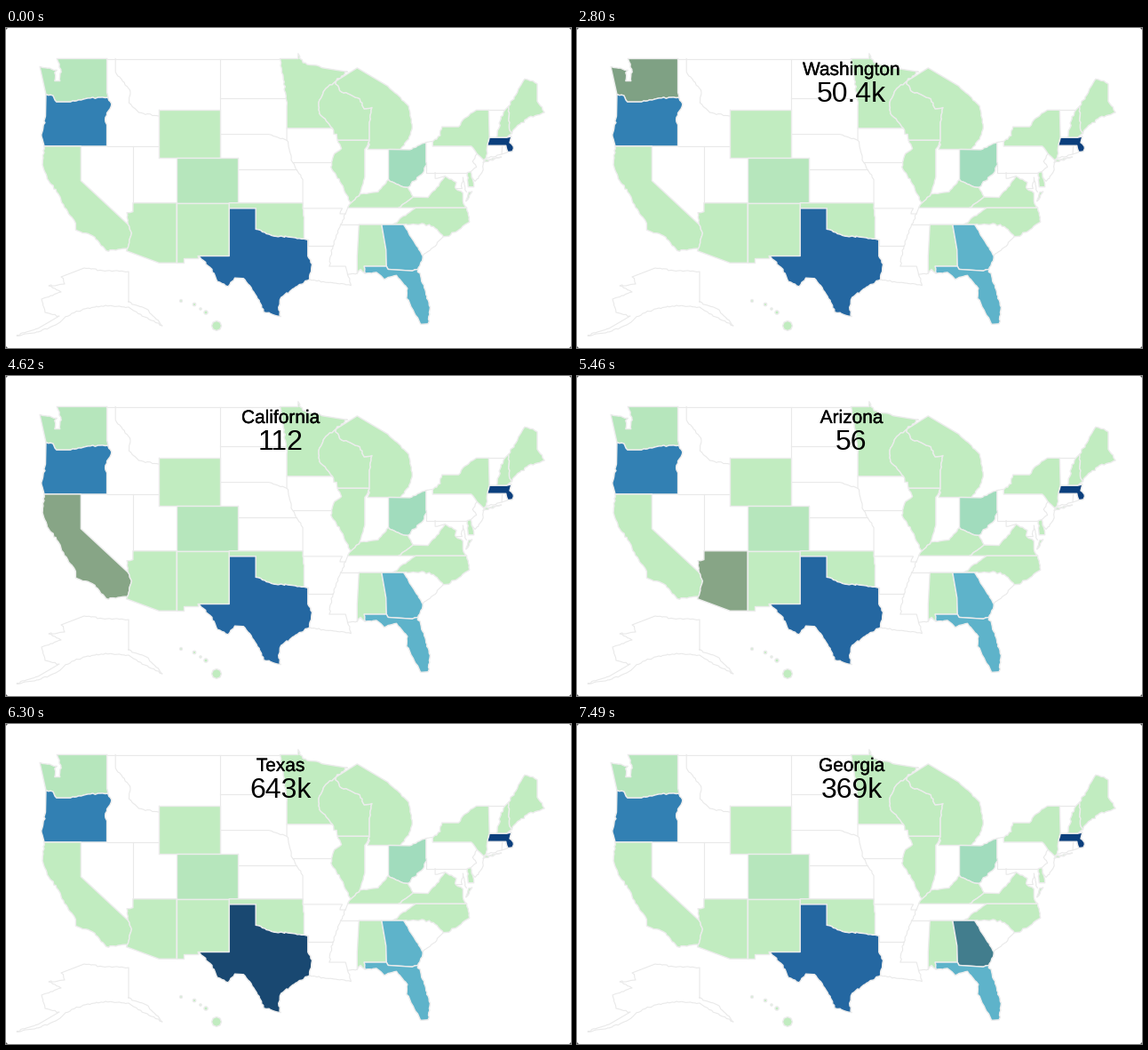
These frames come from a looping animation (636x360 px, 8000 ms). A matplotlib script:

```python
import numpy as np
import matplotlib.pyplot as plt
from matplotlib.animation import FuncAnimation
from matplotlib.colors import to_rgb
from matplotlib.patches import Polygon
from matplotlib.patheffects import withStroke

W, H, DPI = 636, 360, 100
PX = 72 / DPI
STEP, LOOP = 40, 8000
SCALE = 9.84  # pixels per degree of longitude

EDGE, FAINT = "#ececec", "#e9e9e9"
LIGHT, MINT, TEAL = "#c1ecc0", "#b6e6bc", "#a1dcbd"
SKY, BLUE, ROYAL, NAVY = "#5eb3ca", "#3280b3", "#2467a1", "#0b3f7d"

fig = plt.figure(figsize=(W / DPI, H / DPI), dpi=DPI, facecolor="white")
ax = fig.add_axes([0, 0, 1, 1])
ax.set(xlim=(0, W), ylim=(H, 0))
ax.axis("off")

shapes = {}


def merc(lat):
    return np.log(np.tan(np.pi / 4 + np.radians(lat) / 2))


def project(pts, west=124.73, north=49, x0=37.8, y0=34.5):
    """Mercator map of (degrees west, degrees north) to stage pixels."""
    lon, lat = np.array(pts, float).T
    return np.column_stack([x0 + SCALE * (west - lon),
                            y0 + np.degrees(SCALE) * (merc(north) - merc(lat))])


def meander(a, b):
    """Surveyed borders (axis-aligned or long) stay straight, the rest wander.

    The seed depends on both ends alike, so neighbours share one border."""
    size = np.hypot(*(b - a))
    n = int(size / 2.5)
    if n < 2 or size > 27 or min(abs(b - a)) < 0.6:
        return a[None]
    p, q = (a, b) if a[0] < b[0] else (b, a)
    line = p + (q - p) * np.linspace(0, 1, n + 1)[:, None]
    line[1:-1] += np.random.default_rng(int(a @ b)).normal(0, 0.5, (n - 1, 2))
    return (line if p is a else line[::-1])[:-1]


def rough(xy):
    return np.vstack([meander(a, b) for a, b in zip(xy, xy[1:])] + [xy[-1:]])


def fill(xy, color):
    ring = rough(np.vstack([xy, xy[:1]]))
    return ax.add_patch(Polygon(ring, fc=color, ec=EDGE, lw=1.4 * PX,
                                joinstyle="round", zorder=2))


def outline(xy):
    ax.plot(*rough(xy).T, color=FAINT, lw=1.1 * PX, zorder=1)


def state(name, color, *pts):
    shapes[name] = fill(project(pts), color)


def box(name, color, w, e, n, s):
    state(name, color, (w, n), (e, n), (e, s), (w, s))


def border(*pts):
    outline(project(pts))


def back(pts):
    return pts[::-1]


# Borders shared by two states
COLUMBIA = [(124, 46.25), (123.2, 46.15), (122.8, 45.65), (121.2, 45.65),
            (119.2, 45.95), (116.92, 46)]
COLORADO = [(114.05, 36.2), (114.75, 36.1), (114.6, 35), (114.2, 34.2), (114.7, 32.7)]
RED = [(100, 34.56), (97.9, 33.9), (96, 33.8), (94.48, 33.64)]
ST_CROIX = [(92, 46.7), (92.8, 45.6), (92.7, 44.7), (91.22, 43.5)]
UP_LINE = [(90.4, 46.55), (88.1, 45.9), (87.6, 45.1), (86.7, 45.2), (87, 44), (87, 42.5)]
OHIO_W = [(89.1, 37), (88.1, 37.8), (86, 38), (84.82, 39.1)]
OHIO_E = [(84.82, 39.1), (83.7, 38.65), (82.6, 38.4)]
SMOKY = [(84.3, 35), (83.1, 35.8), (81.7, 36.55)]
CHATTAHOOCHEE = [(85.6, 35), (85.1, 32.6), (85.05, 31)]
FLORIDA_N = [(85.05, 31), (84.86, 30.7), (82.1, 30.55), (81.45, 30.7)]
MAINE_W = [(71.08, 45.3), (70.98, 43.4), (70.7, 43.07)]

# Plain states: only the borders that no coloured state draws
border((117.03, 49), (97.23, 49))
border((117.03, 49), (117.03, 46.4), (116.92, 46))
border((116.05, 49), (116.05, 48), (114.4, 46.6), (114.5, 45.56), (113.4, 44.8),
       (111.05, 44.5), (111.05, 45))
border((117.03, 42), (111.05, 42))
border((111.05, 44.5), (111.05, 41))
border((114.05, 42), (114.05, 36.2))
border((104.05, 49), (104.05, 41))
border((104.05, 45.94), (96.56, 45.94))
border((104.05, 43), (98.5, 43), (96.45, 42.5))
border((102.05, 40), (95.3, 40))
border((102.05, 37), (94.62, 37))
border((102.05, 41), (102.05, 37))
border((96.45, 43.5), (96.45, 42.5), (95.77, 40.6), (94.62, 39.1), (94.62, 36.5),
       (90.1, 36.5), (90.37, 36), (89.7, 36))
border((95.77, 40.6), (91.4, 40.6))
border((89.5, 36.5), (90.3, 35), (91.17, 33), (91.6, 31), (89.73, 31), (89.5, 30.2))
border((94.04, 33.55), (94.04, 33), (91.17, 33))
border((90.3, 35), (83.1, 35))
border((88.4, 30.3), (89.5, 30.2), (89.1, 29.1), (91.4, 29.4), (93.85, 29.7))
border((78.55, 33.86), (79.3, 33.1), (80.9, 32.03))
border((80.52, 40.64), (80.52, 39.72), (75.8, 39.72))
border((79.48, 39.72), (79.48, 39.2), (78.35, 39.4))
border((80.52, 42.33), (79.76, 42.4))
border((74.7, 41.36), (75.2, 40.7), (74.75, 40.2), (75.4, 39.8))
border((73.9, 41), (74.1, 39.75), (74.9, 38.95), (75.5, 39.5))
border((77, 38.3), (76.4, 38.3), (76.3, 39.3), (75.9, 38))
border((73.35, 45), (71.5, 45))
border((71.38, 42.05), (71.15, 41.5), (71.86, 41.32), (73.65, 41))
border((71.8, 42.05), (71.86, 41.32))

# West
state("Washington", MINT, (124.7, 48.4), (122.75, 48.13), (123, 47.3), (122.4, 47.3),
      (122.3, 48.2), (122.75, 49), (117.03, 49), (117.03, 46.4), *back(COLUMBIA))
state("Oregon", BLUE, *COLUMBIA, (116.5, 45.5), (117.2, 44.4), (117.03, 43.8),
      (117.03, 42), (124.2, 42), (124.5, 42.8), (124.05, 44.5))
state("California", LIGHT, (124.2, 42), (120, 42), (120, 39), *COLORADO[2:],
      (117.12, 32.53), (118.4, 33.8), (119.2, 34.15), (120.6, 34.5), (120.6, 35.1),
      (121.9, 36.6), (122.5, 37.7), (123.7, 39), (124.4, 40.4))
state("Arizona", LIGHT, (114.05, 37), (109.05, 37), (109.05, 31.33), (111.07, 31.33),
      (114.8, 32.5), *back(COLORADO))
box("Wyoming", LIGHT, 111.05, 104.05, 45, 41)
box("Colorado", MINT, 109.05, 102.05, 41, 37)
state("New Mexico", LIGHT, (109.05, 37), (103.04, 37), (103.04, 32), (106.62, 32),
      (106.62, 31.78), (108.2, 31.78), (108.2, 31.33), (109.05, 31.33))
state("Oklahoma", LIGHT, (103.04, 37), (94.62, 37), (94.48, 35.4), *back(RED),
      (100, 36.5), (103.04, 36.5))
state("Texas", ROYAL, (103.04, 36.5), (100, 36.5), *RED, (94.04, 33.55), (94.04, 32),
      (93.55, 31.2), (93.85, 29.7), (95, 29.2), (97.1, 27.9), (97.4, 26.9),
      (97.15, 25.95), (99.1, 26.4), (99.6, 27.6), (100.7, 29.1), (101.4, 29.8),
      (102.4, 29.85), (103.15, 29), (104.4, 29.5), (105, 30.7), (106.62, 32),
      (103.04, 32))

# Lakes
state("Minnesota", LIGHT, (97.23, 49), (95.15, 49), (95.15, 49.38), (94.6, 48.7),
      (92.3, 48.3), (89.5, 48), (90.8, 47.3), *ST_CROIX, (96.45, 43.5), (96.45, 45.3),
      (96.56, 45.94), (96.85, 47.6))
state("Wisconsin", LIGHT, (90.8, 47.3), *ST_CROIX, (90.64, 42.5), *back(UP_LINE))
state("Michigan", LIGHT, *back(UP_LINE), (90.8, 47.3), (88.4, 48.3), (84.9, 46.9),
      (83.6, 46.1), (82.5, 45.3), (82.1, 43.6), (82.5, 42.6), (83.45, 41.73),
      (87.2, 41.73))
state("Illinois", LIGHT, (87, 42.5), (87.53, 41.73), (87.53, 39.35), (88.1, 37.8),
      (89.1, 37), (90.2, 38.7), (91.4, 40.2), (91.1, 41.2), (90.2, 41.8),
      (90.64, 42.5))
state("Ohio", TEAL, (84.82, 41.73), (82.4, 41.7), (80.52, 42.33), (80.52, 40.64),
      (80.85, 39.7), *back(OHIO_E), *OHIO_E[:1])

# South
state("Kentucky", LIGHT, *OHIO_W, *OHIO_E, (82, 37.54), (83.67, 36.55), (89.5, 36.55))
state("Virginia", LIGHT, (83.67, 36.55), (75.87, 36.55), (76.3, 37.2), (76.3, 37.9),
      (77.2, 38.4), (77.05, 38.85), (78.35, 39.4), (79.3, 38.4), (80.3, 37.5),
      (82, 37.54))
state("Eastern Shore", LIGHT, (75.95, 37.15), (75.25, 38.03), (75.65, 37.95))
state("North Carolina", LIGHT, (83.1, 35), (81, 35.1), (79.67, 34.8), (78.55, 33.86),
      (77.9, 33.9), (76.5, 34.65), (75.55, 35.25), (75.87, 36.55), *back(SMOKY))
state("Alabama", LIGHT, *CHATTAHOOCHEE, (87.6, 31), (87.5, 30.3), (88, 30.7),
      (88.4, 30.3), (88.4, 32), (88.2, 35))
state("Georgia", SKY, (83.1, 35), (81.9, 33.4), (80.9, 32.03), *back(FLORIDA_N),
      *back(CHATTAHOOCHEE))
state("Florida", SKY, *FLORIDA_N, (80.55, 28.45), (80.05, 26.9), (80.3, 25.2),
      (81.1, 25.15), (81.9, 26.4), (82.75, 27.8), (82.65, 28.8), (83.9, 30.1),
      (85.3, 29.7), (86.2, 30.4), (87.5, 30.3), (87.6, 31))

# Northeast
state("Delaware", LIGHT, (75.8, 39.72), (75.4, 39.8), (75.05, 38.45), (75.7, 38.45))
state("New York", LIGHT, (79.76, 42), (79.76, 42.4), (78.9, 42.9), (78.7, 43.63),
      (76.8, 43.63), (76.3, 44.2), (74.75, 45), (73.35, 45), (73.27, 42.75),
      (73.5, 42.05), (73.65, 41), (73.9, 40.8), (74.7, 41.36), (75.35, 42))
state("Long Island", LIGHT, (74, 40.6), (73.7, 40.87), (71.9, 41.07))
state("New Hampshire", LIGHT, *MAINE_W, (71.3, 42.73), (72.46, 42.73), (72.05, 44.1),
      (71.5, 45))
state("Maine", LIGHT, *back(MAINE_W), (70.25, 46.2), (69.23, 47.45), (68.3, 47.3),
      (67.8, 47.07), (67.8, 45.7), (66.97, 44.8), (68.8, 44.4), (70.2, 43.6))
state("Massachusetts", NAVY, (73.27, 42.73), (71.3, 42.73), (70.75, 42.85),
      (70.95, 42.3), (70.5, 41.8), (70.65, 41.55), (71.15, 41.5), (71.38, 42.05),
      (73.5, 42.05))

# Insets, placed directly in pixels
outline(np.array([(138, 308), (138, 274), (114, 273), (88, 270), (62, 280), (66, 288),
                  (48, 290), (62, 297), (40, 305), (44, 320), (60, 324), (36, 338),
                  (12, 346), (32, 343), (56, 334), (74, 321), (92, 315), (112, 312),
                  (138, 314), (156, 325), (176, 335), (158, 316), (138, 308)], float))
turn = np.linspace(0, 2 * np.pi, 9)[:-1, None]
for x, y, r in [(197, 307, 1.5), (212, 311, 1.8), (219, 316, 1.2), (225, 320, 2.2),
                (237, 335, 5.5)]:
    fill(np.hstack([x + r * np.cos(turn), y + r * np.sin(turn)]), LIGHT)

# Dark slivers left by the rounded window corners
for x, y in np.ndindex(2, 2):
    corner = np.array([(0, 0), (1 - 2 * x, 0), (0, 1 - 2 * y)]) * 2 + (x * W, y * H)
    ax.add_patch(Polygon(corner, fc="#555555", lw=0, zorder=3))


def label(y, size, **style):
    return ax.text(309, y, "", ha="center", va="baseline", fontsize=size * PX,
                   family="Liberation Sans", color="black", zorder=5, **style)


title = label(53, 20.9, path_effects=[withStroke(linewidth=0.3 * PX, foreground="black")])
value = label(83, 32)

# Hover start in ms, state, value
HOVERS = [(0, "", ""), (1960, "Washington", "50.4k"), (2870, "Oregon", "551k"),
          (3850, "California", "112"), (4690, "Arizona", "56"),
          (5530, "New Mexico", "48"), (6270, "Texas", "643k"), (7140, "", ""),
          (7400, "Georgia", "369k")]
base = {name: np.array(to_rgb(p.get_facecolor())) for name, p in shapes.items()}


def update(i):
    _, active, amount = [h for h in HOVERS if h[0] <= i * STEP][-1]
    for name, patch in shapes.items():
        patch.set_facecolor(base[name] * (0.7 if name == active else 1))
    title.set_text(active)
    value.set_text(amount)
    return [*shapes.values(), title, value]


anim = FuncAnimation(fig, update, frames=LOOP // STEP, interval=STEP,
                     repeat=True, repeat_delay=0, blit=False)
plt.show()
```
